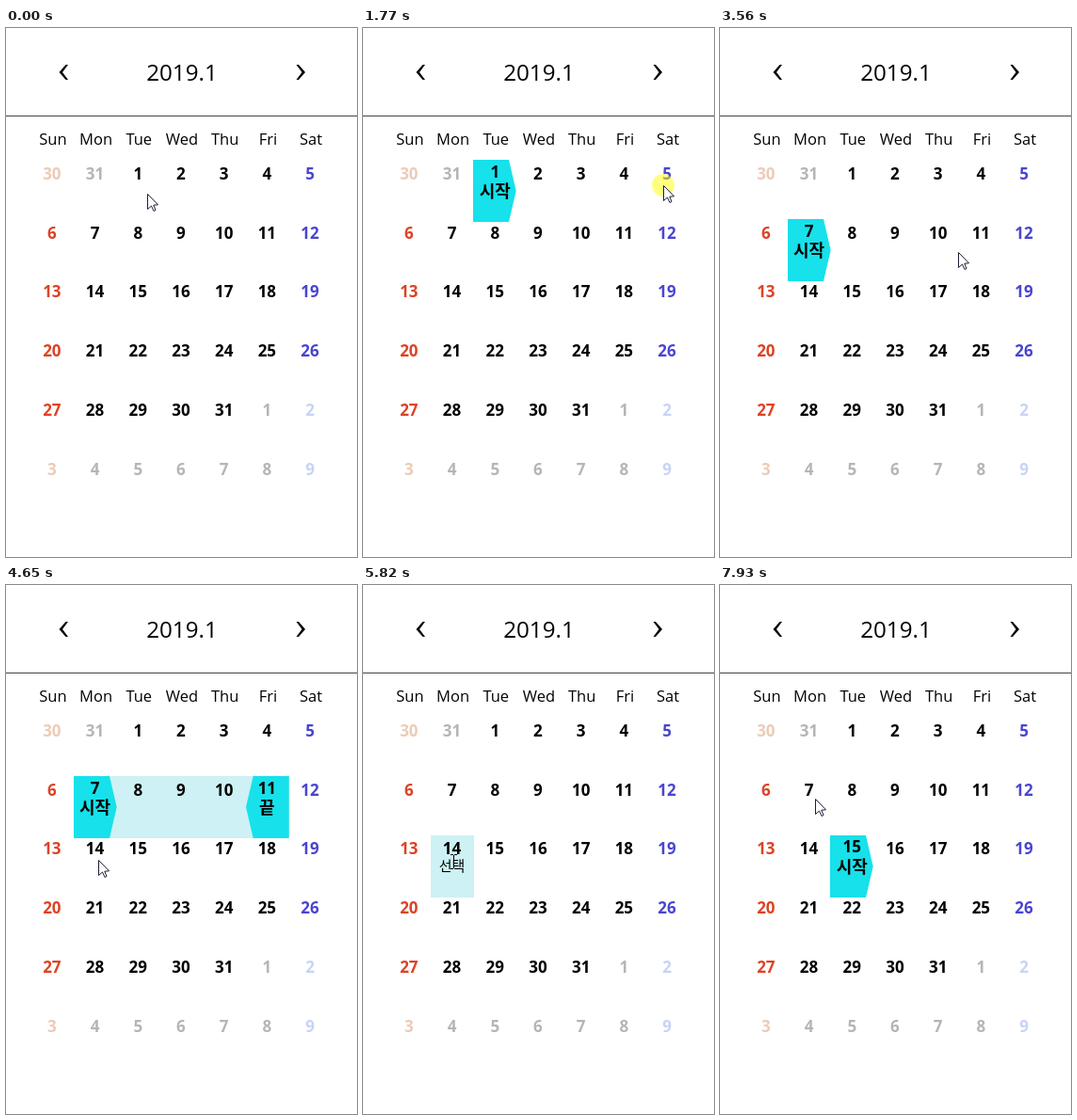
Animation, 373 px wide and 562 px high, one loop 7990 ms. Source, as an HTML page with a canvas:

```html
<!DOCTYPE html>
<html lang="ko">
<head>
<meta charset="utf-8">
<title>Calendar range picker</title>
<style>
  html, body { margin: 0; width: 100%; height: 100%; overflow: hidden; background: #fff; }
  canvas { display: block; width: 100vw; height: 100vh; }
</style>
</head>
<body>
<canvas id="stage" width="373" height="562"></canvas>
<script>
const ctx = document.getElementById('stage').getContext('2d');
const LOOP = 7990, TICK = 75;
const PRESS_TIME = 150, SELECT_DELAY = 200;
const LEFT = 26, TOP = 140, CELL_W = 45.7, ROW_H = 62.75, CELL_H = 66;
const LATIN = '"Open Sans", "Noto Sans", sans-serif';
const HANGUL = '"Noto Sans CJK KR", "Noto Sans CJK", sans-serif';
const CYAN = '#17e1ea', PALE = '#cdf1f4';

// Where the pointer goes; it sets off at `leave` and clicks at `press`
const visit = (leave, press, x, y) => ({ leave, press, x, y });
const VISITS = [
  visit(470, 780, 145, 170),
  visit(1250, 1770, 319, 167),
  visit(2330, 2830, 97, 240),
  visit(3180, 3740, 258, 238),
  visit(4340, 4800, 94, 293),
  visit(5590, 5590, 94, 293),
  visit(6540, 6920, 146, 293),
  visit(7620, 8005, 101, 227)
];

const cellAt = ({ x, y }) =>
  7 * Math.floor((y - TOP) / ROW_H) + Math.floor((x - LEFT) / CELL_W);
const cellX = i => Math.round(LEFT + CELL_W * (i % 7));
const cellY = i => Math.round(TOP + ROW_H * Math.floor(i / 7));
const centerX = i => LEFT + CELL_W * (i % 7 + 0.5);

// The pointer advances once per tick and slows down towards its goal
function pointerAt(t) {
  let x = 150, y = 176;
  for (const stop of VISITS.filter(v => v.leave <= t)) {
    const travel = stop.press - stop.leave;
    const ticks = Math.floor((t - stop.leave) / TICK) + 1;
    const p = Math.min(1, ticks * TICK / Math.max(travel, TICK));
    const eased = 1 - (1 - p * p) ** 3.3;
    x += (stop.x - x) * eased;
    y += (stop.y - y) * eased;
  }
  return { x: Math.round(x), y: Math.round(y) };
}

// A first click opens a range; a second closes it, or picks a single day
function selectionAt(t) {
  let selection = { kind: 'none' };
  for (const stop of VISITS.filter(v => v.press + SELECT_DELAY <= t)) {
    const cell = cellAt(stop), { kind, first } = selection;
    if (kind !== 'start') selection = { kind: 'start', first: cell, last: cell };
    else selection = { kind: cell === first ? 'single' : 'range', first, last: cell };
  }
  return selection;
}

function labelFor(i, { kind, first, last }) {
  if (i === first) return kind === 'single' ? '선택' : '시작';
  return i === last ? '끝' : '';
}

function text(str, x, y, font, color = '#000') {
  ctx.font = font;
  ctx.fillStyle = color;
  ctx.fillText(str, x, y);
}

function polygon(points, fill, stroke) {
  ctx.beginPath();
  points.forEach(([x, y]) => ctx.lineTo(x, y));
  ctx.closePath();
  ctx.fillStyle = fill;
  ctx.fill();
  if (stroke) {
    ctx.strokeStyle = stroke;
    ctx.stroke();
  }
}

function chevron(tip, dir) {
  const back = tip - 7 * dir, thick = 3.5 * dir;
  polygon([[back, 39], [back - thick + dir, 39], [tip - thick, 47],
           [back - thick + dir, 55], [back, 55], [tip, 47]], '#000');
}

function drawHeader() {
  chevron(56.5, -1);
  chevron(318, 1);
  text('2019.1', 187, 56, `24.2px ${LATIN}`);
  ctx.fillStyle = '#444';
  ctx.fillRect(0, 93, 373, 1);
  ['Sun', 'Mon', 'Tue', 'Wed', 'Thu', 'Fri', 'Sat'].forEach((name, i) =>
    text(name, centerX(i) + 1, 124, `16.5px ${LATIN}`));
}

// Pentagon pointing into the range; dir is 1 at its start, -1 at its end
function drawTag(i, dir) {
  const y = cellY(i);
  const flat = dir > 0 ? cellX(i) : cellX(i) + CELL_W;
  const shoulder = flat + 38 * dir;
  polygon([[flat, y], [shoulder, y], [flat + CELL_W * dir, y + CELL_H / 2],
           [shoulder, y + CELL_H], [flat, y + CELL_H]], CYAN);
}

function dayColor(i) {
  const faded = i < 2 || i > 32;
  if (i % 7 === 0) return faded ? '#eccbb7' : '#dd4325';
  if (i % 7 === 6) return faded ? '#c8d3f5' : '#4a45d0';
  return faded ? '#b5b5b5' : '#000';
}

function drawDays(selection) {
  const { kind, first, last } = selection;
  if (kind === 'range' || kind === 'single') {
    ctx.fillStyle = PALE;
    ctx.fillRect(cellX(first), cellY(first), Math.round(CELL_W * (last - first + 1)), CELL_H);
  }
  if (kind === 'range' || kind === 'start') drawTag(first, 1);
  if (kind === 'range') drawTag(last, -1);

  for (let i = 0; i < 42; i++) {
    const day = i < 2 ? 30 + i : (i - 2) % 31 + 1;
    const label = labelFor(i, selection);
    const tagged = label && kind !== 'single';
    const baseline = Math.round(TOP + 20.9 + ROW_H * Math.floor(i / 7));
    text(day, centerX(i), baseline - (tagged ? 2 : 0), `bold 17px ${LATIN}`, dayColor(i));
    text(label, centerX(i), cellY(i) + (tagged ? 40 : 38),
         `${tagged ? 'bold 18px' : '15px'} ${HANGUL}`, dayColor(i));
  }
}

function isOverLabel({ x, y }, selection) {
  const i = cellAt({ x, y });
  const row = y - cellY(i);
  const halfWidth = labelFor(i, selection).length * 9;
  return row > 25 && row < 45 && Math.abs(x - centerX(i)) < halfWidth;
}

function drawPointer(t, selection) {
  const { x, y } = pointerAt(t);
  if (VISITS.some(v => t >= v.press && t < v.press + PRESS_TIME)) {
    ctx.fillStyle = 'rgba(255,255,0,.5)';
    ctx.beginPath();
    ctx.arc(x, y, 12, 0, 7);
    ctx.fill();
  }
  if (isOverLabel({ x, y }, selection)) {
    ctx.fillStyle = '#000';
    for (const edge of [y - 7, y + 8]) {
      ctx.fillRect(x - 1, edge, 3, 1);
      ctx.fillRect(x + 3, edge, 3, 1);
    }
    ctx.fillRect(x + 2, y - 6, 1, 14);
  } else {
    const arrow = [[0, 0], [0, 16], [4, 12.5], [6.5, 18], [8.5, 17], [6.3, 11.7], [11, 11.3]];
    polygon(arrow.map(([dx, dy]) => [x + dx + 0.5, y + dy + 0.5]), '#fff', '#1c1c38');
  }
}

let origin;
function frame(now) {
  origin ??= now;
  const t = (now - origin) % LOOP;
  const selection = selectionAt(t);
  ctx.fillStyle = '#fff';
  ctx.fillRect(0, 0, 373, 562);
  ctx.textAlign = 'center';
  drawHeader();
  drawDays(selection);
  drawPointer(t, selection);
  requestAnimationFrame(frame);
}
requestAnimationFrame(frame);
</script>
</body>
</html>
```
